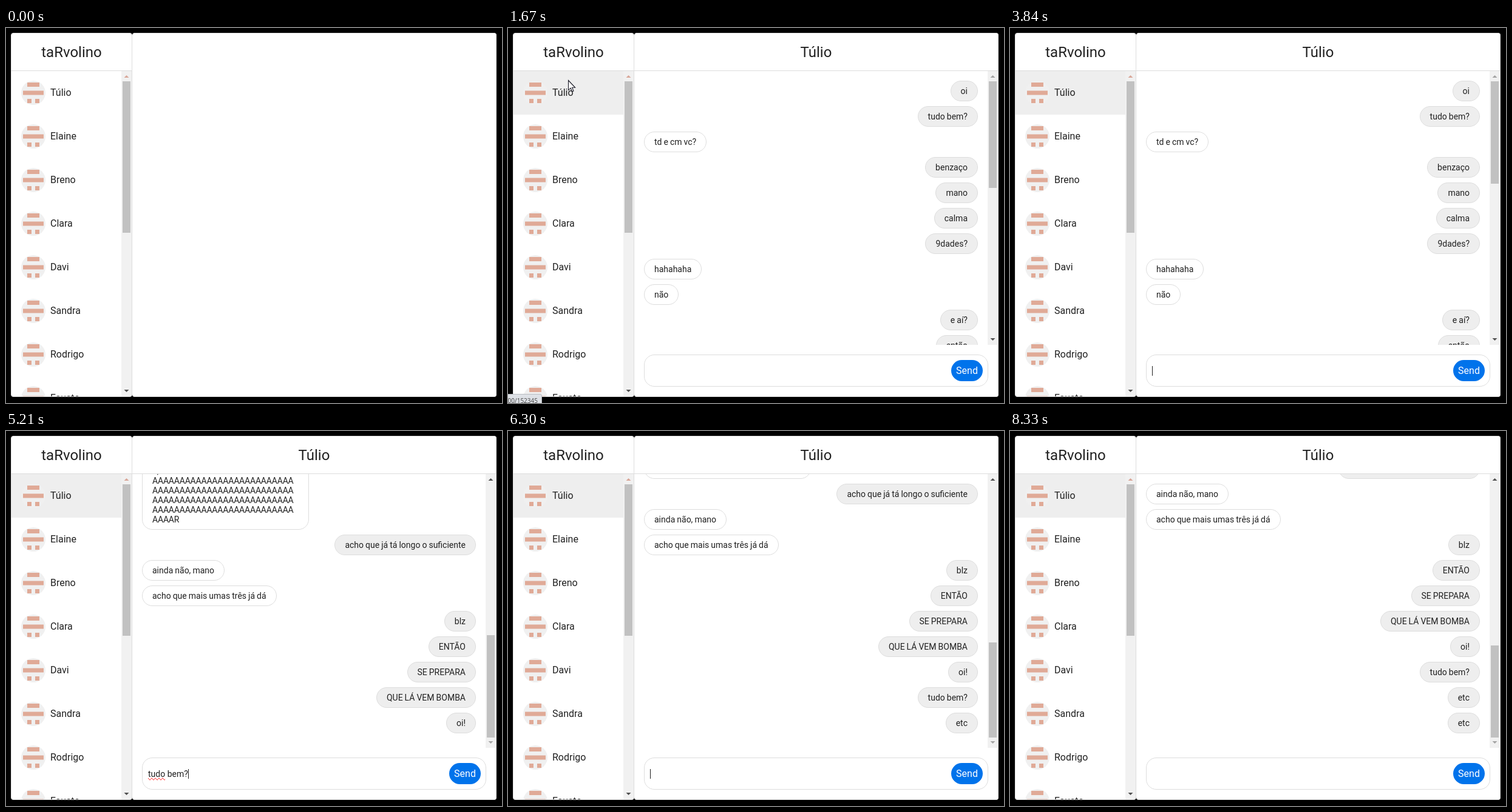
An HTML page for the animation above (8.5 s loop, 817 px wide and 619 px high).

```html
<!DOCTYPE html>
<html lang="pt">
<head>
<meta charset="utf-8">
<title>Chat</title>
<style>
* { box-sizing: border-box; }
html, body { margin: 0; width: 100%; height: 100%; overflow: hidden; background: #000; }
body { position: relative; font: 16px/24px Roboto, sans-serif; color: #212121; }
.panel, .abs { position: absolute; }
.panel { top: 8px; height: 601px; background: #fff; border: 1px solid #ddd; border-radius: 4px; overflow: hidden; }
#side { left: 8px; width: 200px; }
#main { left: 208px; width: 600px; border-left: 0; }
h1 { margin: 0; height: 62px; font: 24px/62px Roboto, sans-serif; text-align: center; border-bottom: 1px solid #ddd; }
.row { height: 72px; width: 181px; padding: 16px; display: flex; align-items: center; gap: 8px; }
.row svg { width: 40px; height: 40px; flex: none; }
.bar { position: absolute; right: 0; top: 62px; width: 17px; background: #f1f1f1; }
.bar svg { position: absolute; left: 0; width: 17px; height: 17px; }
.bar .down { bottom: 0; transform: scaleY(-1); }
.thumb { position: absolute; left: 2px; width: 13px; top: 17px; background: #c1c1c1; }
#view { left: 0; top: 62px; width: 582px; height: 452px; overflow: hidden; }
#log { display: flex; flex-direction: column; align-items: flex-start; padding: 16px; }
.msg { flex: none; max-width: 275px; padding: 8px 16px; margin-bottom: 8px; border: 1px solid #ddd; border-radius: 17px;
  font-size: 14px; line-height: 16px; word-spacing: -.45px; overflow-wrap: anywhere; }
.mine { align-self: flex-end; background: #eee; }
.long { letter-spacing: -.19px; }
.last { margin-top: auto; }
#field { left: 16px; top: 530px; width: 567px; height: 53px; border: 1px solid #ddd; border-radius: 17px; }
#draft { left: 9px; top: 18px; height: 16px; font-size: 14px; line-height: 16px; white-space: pre; display: flex; }
#draft u { text-decoration: underline wavy #e53935 1px; text-decoration-line: spelling-error; }
#caret { width: 1px; height: 16px; background: #212121; }
#send { right: 8px; top: 8px; width: 52px; height: 35px; border-radius: 17.5px; background: #0073eb; color: #fff; text-align: center; line-height: 35px; }
#status { left: -1px; top: 604px; width: 57px; height: 20px; padding-right: 6px; background: #dee1e6; border: 1px solid #b8bbc0;
  border-radius: 0 3px 0 0; font: 10px/20px "Open Sans", sans-serif; color: #444; display: flex; justify-content: flex-end; overflow: hidden; }
#cursor { left: 0; top: 0; width: 30px; height: 30px; overflow: visible; fill: #fff; stroke: #1c1c28; stroke-width: 1.1; }
</style>
</head>
<body>
<div class="panel" id="side"><h1>taRvolino</h1></div>
<div class="panel" id="main">
  <div id="chat">
    <h1>Túlio</h1>
    <div class="abs" id="view"><div id="log"></div></div>
    <div class="abs" id="field">
      <div class="abs" id="draft"><span id="typed"></span><i id="caret"></i></div>
      <div class="abs" id="send">Send</div>
    </div>
  </div>
</div>
<div class="abs" id="status">00/152345</div>
<svg class="abs" id="cursor">
  <path id="arrow" d="M.5.5V16.6L4.2 13.2L6.7 19L9 18L6.6 12.3H11.6Z"/>
  <g id="hand" transform="translate(-6 -.5)">
    <path d="M5.2 14V2.3a1.6 1.6 0 0 1 3.2 0V8.6c.4-1.3 2.9-1.2 3.1.5c.5-1.2 2.7-.9 2.9.7c.6-1 2.8-.6 2.8 1.3V16.5c0 2.2-1.6 3.2-1.8 5.6c-.2 1.6-1 2.4-2.2 2.4H8.5c-1.2 0-2-.7-2.3-1.8C5.4 20 3 18.2 1 14.8C.1 12.7 2.3 11.2 3.8 12.7Z"/>
    <path d="M8.4 8.6V12.5M11.5 9V12.5M14.4 9.8V13" fill="none"/>
  </g>
  <path id="beam" d="M-3 -8H-1L0 -7L1 -8H3M0 -7V7M-3 8H-1L0 7L1 8H3" fill="none"/>
</svg>
<script>
const LOOP = 8500, VIEW = 452, BASE_HEIGHT = 1073, ROW = 42;
const $ = id => document.getElementById(id);
const show = (el, on) => { el.style.display = on ? '' : 'none'; };
const add = (parent, html) => {
  parent.insertAdjacentHTML('beforeend', html);
  return parent.lastElementChild;
};

// Contact list
const avatar = `<svg viewBox="-20 -20 40 40"><circle r="20" fill="#f0f0f0"/>
  <path fill="#e0aa97" d="M-10 -17h20v7h-20zM-17 -3.5h34v7h-34zM-10 10h7v7h-7zM3 10h7v7h-7z"/></svg>`;
const rows = ['Túlio', 'Elaine', 'Breno', 'Clara', 'Davi', 'Sandra', 'Rodrigo', 'Fausto']
  .map(name => add($('side'), `<div class="row">${avatar}<span>${name}</span></div>`));

// Scroll bars
function addBar(parent, height) {
  const tip = '<path d="M4.5 11L8.5 7L12.5 11Z"/>';
  const bar = add(parent, `<div class="bar" style="height:${height}px">
    <svg class="up">${tip}</svg><svg class="down">${tip}</svg><div class="thumb"></div></div>`);
  const [up, down, thumb] = bar.children;
  return (top, size, upColor, downColor) => {
    thumb.style.top = top + 'px';
    thumb.style.height = size + 'px';
    up.style.fill = upColor;
    down.style.fill = downColor;
  };
}
addBar($('side'), 537)(17, 250, '#d9a698', '#505050');
const setBar = addBar($('chat'), VIEW);

// Messages: ">" marks the ones sent from here
const addMsg = (text, extra = '') => {
  const mine = text[0] === '>';
  return add($('log'), `<div class="msg ${mine ? 'mine' : ''} ${extra}">${mine ? text.slice(1) : text}</div>`);
};
['>oi', '>tudo bem?', 'td e cm vc?', '>benzaço', '>mano', '>calma', '>9dades?', 'hahahaha', 'não', '>e aí?', '>então']
  .forEach(m => addMsg(m));
addMsg('É, VAMOS TESTAR AGORA<br>' + 'A'.repeat(108) + 'R', 'long last');
['>acho que já tá longo o suficiente', 'ainda não, mano', 'acho que mais umas três já dá',
  '>blz', '>ENTÃO', '>SE PREPARA', '>QUE LÁ VEM BOMBA'].forEach(m => addMsg(m));

// Typed texts: time of each key, then of sending
const drafts = [
  { text: 'oi!', keys: [3310, 3460, 3690], sent: 3840 },
  { text: 'tudo bem?', keys: [4380, 4460, 4540, 4690, 4770, 4850, 4920, 5000, 5210], sent: 5460 },
  { text: 'etc', keys: [5840, 5920, 6150], sent: 6300 },
  { text: 'etc', keys: [6470, 6540, 6790], sent: 7020 }
];
drafts.forEach(d => { d.el = addMsg('>' + d.text); });

const caretOff = [[0, 2590], [3140, 3310], [7570, 8100], [8330, LOOP]];
const within = (t, [a, b]) => t >= a && t < b;

// Pointer legs, sampled in 77 ms steps with a cosine ease
const legs = [
  { from: 440, to: 1210, a: [695, 547], b: [99, 86] },
  { from: 1900, to: 2516, a: [99, 86], b: [560, 566] },
  { from: 2516, to: 2670, a: [560, 566], b: [565, 614] }
];
function pointer(t) {
  const leg = legs.filter(l => t >= l.from).pop();
  if (!leg || t >= 2760) return null;
  // The first visible step of the later legs is already under way
  const lead = leg === legs[0] ? 0 : 77;
  const time = Math.floor((t - leg.from) / 77) * 77 + lead;
  const p = Math.min(1, time / (leg.to - leg.from));
  const e = (1 - Math.cos(Math.PI * p)) / 2;
  return leg.a.map((v, i) => Math.round(v + (leg.b[i] - v) * e));
}

function drawPointer(t) {
  const pos = pointer(t);
  show($('cursor'), pos);
  let hover = -1;
  if (pos) {
    const [x, y] = pos;
    $('cursor').style.transform = `translate(${x}px,${y}px)`;
    if (x < 190 && y > 71) hover = Math.floor((y - 71) / 72);
    const hand = hover >= 0 && (t < 1440 || hover > 0);
    const beam = t > 1900 && x > 224 && y > 539 && y < 592;
    show($('hand'), hand);
    show($('beam'), beam);
    show($('arrow'), !hand && !beam);
  }
  rows.forEach((row, i) => {
    row.style.background = i === 0 && t >= 1440 ? '#eee' : i === hover ? '#fafafa' : '';
  });
  show($('status'), t >= 1360 && hover === 0);
}

function drawChat(t) {
  show($('chat'), t >= 1440);
  drafts.forEach(d => show(d.el, t >= d.sent));
  const height = BASE_HEIGHT + ROW * drafts.filter(d => t >= d.sent).length;
  const atEnd = t >= 3920;
  const size = Math.floor((VIEW - 34) * VIEW / height);
  $('log').style.height = height + 'px';
  $('log').style.transform = `translateY(${atEnd ? VIEW - height : 0}px)`;
  setBar(atEnd ? VIEW - 17 - size : 17, size, atEnd ? '#505050' : '#a3a3a3', atEnd ? '#a3a3a3' : '#505050');

  const draft = drafts.find(d => t < d.sent);
  const typed = draft ? draft.text.slice(0, draft.keys.filter(k => t >= k).length) : '';
  $('typed').innerHTML = typed.replace('tudo ', '<u>tudo</u> ');
  $('caret').style.visibility = caretOff.some(span => within(t, span)) ? 'hidden' : 'visible';
}

const start = performance.now();
function frame() {
  const t = (performance.now() - start) % LOOP;
  drawPointer(t);
  drawChat(t);
  requestAnimationFrame(frame);
}
frame();
</script>
</body>
</html>
```
